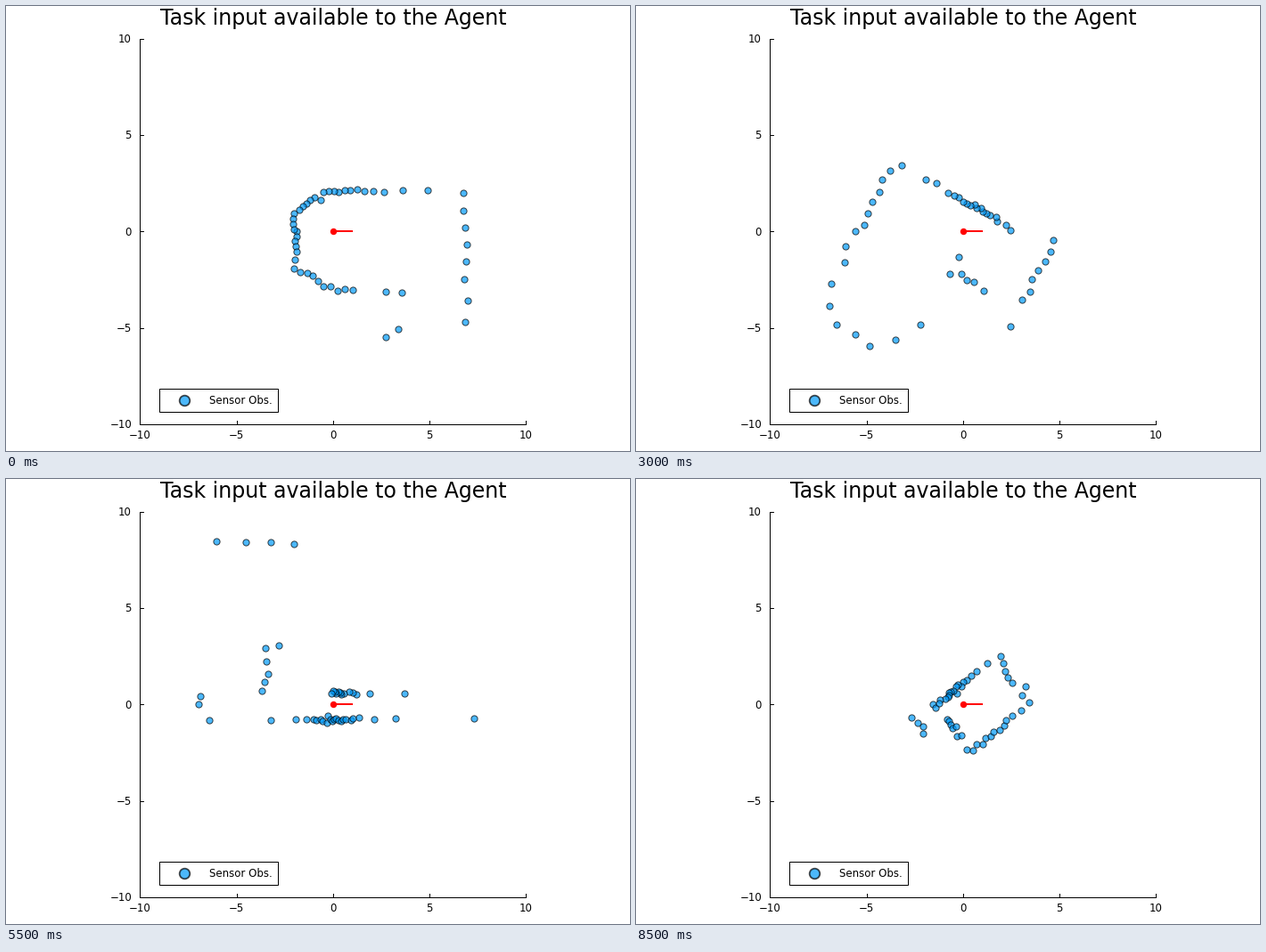
Animation of 700x500 px, one loop 9 s. Source, as a matplotlib script:

```python
import numpy as np
import matplotlib.pyplot as plt
from matplotlib.animation import FuncAnimation
from matplotlib.patches import Rectangle

W, H, DPI = 700, 500, 100
STEPS, STEP_MS = 18, 500
RAYS = np.radians(-180 + np.arange(50) * 360 / 49.5)
NOISE = 0.11
CX, CY, UNIT = 366.8, 253.4, 21.65
BLUE, RED = "#009afa", "red"

plt.rcParams["font.family"] = "DejaVu Sans"

# Floor plan: each line of walls runs through its corners.
FLOOR_PLAN = [
    # large room, south wall of the hall, east side of the corridor
    [(0, 5.32), (0, 6.9), (1.3, 8.7), (4.2, 8.6), (5.2, 6.8), (5.3, -0.1),
     (-2.55, -0.1), (-2.55, -4.45)],
    # hall and north passage
    [(0, 4.42), (0, 2.3), (0, 3.35), (-2.45, 3.35), (-2.45, 6.75),
     (-8.5, 6.75)],
    [(-3.95, 6.75), (-3.95, 4)],
    # west side and end of the corridor
    [(-3.95, 3.2), (-3.85, -10.3), (-2.55, -10.3), (-2.55, -5.2)],
    # small room
    [(-2.55, -4.45), (-2.55, -4.25), (1.55, -4.25), (1.55, -7.25),
     (-2.55, -7.25)],
]
START = np.array([p for wall in FLOOR_PLAN for p in wall[:-1]])
SPAN = np.array([p for wall in FLOOR_PLAN for p in wall[1:]]) - START

# The agent's walk: step, x, y, heading in degrees.
WALK = np.array([
    (0, 3.1, 6.75, -90), (2, 2.45, 4.2, -114), (4, 2, 3.1, -121),
    (6, 0.5, 1.3, -150), (8, -1.9, 1.5, -161), (9, -2.6, 0.9, -130),
    (11, -3.15, -0.2, -90), (13, -3.15, -2.65, -90), (14, -3.1, -3.9, -75),
    (15, -3.05, -4.55, -13), (16, -2.5, -4.8, -20), (17, -1.35, -5.15, -39),
]).T


def cross(a, b):
    return a[..., 0] * b[..., 1] - a[..., 1] * b[..., 0]


def cast(pos, angles):
    """Distance from pos to the nearest wall along each angle."""
    ray = np.stack([np.cos(angles), np.sin(angles)], axis=-1)[:, None]
    to_wall = START - pos
    det = cross(ray, SPAN)
    with np.errstate(divide="ignore", invalid="ignore"):
        dist = cross(to_wall, SPAN) / det
        along = cross(to_wall, ray) / det
    hit = (dist > 0) & (along >= 0) & (along <= 1)
    return np.where(hit, dist, 99).min(axis=1)


def stage(x, y):
    return CX + UNIT * x, CY - UNIT * y


def dots_at(step):
    x, y, heading = (np.interp(step, WALK[0], col) for col in WALK[1:])
    noise = np.random.default_rng(step).normal(0, NOISE, RAYS.size)
    dist = cast(np.array([x, y]), RAYS + np.radians(heading)) + noise
    x, y = dist * np.cos(RAYS), dist * np.sin(RAYS)
    seen = (abs(x) < 10) & (abs(y) < 10)
    return np.column_stack(stage(x[seen], y[seen]))


def pt(px):
    return px * 72 / DPI


fig = plt.figure(figsize=(W / DPI, H / DPI), dpi=DPI, facecolor="white")
ax = fig.add_axes([0, 0, 1, 1])
ax.set(xlim=(0, W), ylim=(H, 0))
ax.axis("off")


def line(xs, ys, color="black", px=1, **kw):
    ax.plot(xs, ys, color=color, lw=pt(px), **kw)


def label(x, y, text, px=11.75, ha="center", **kw):
    ax.text(x, y, text, fontsize=pt(px), ha=ha, va="baseline", **kw)


def dot_style(size, edge):
    return dict(s=pt(size) ** 2, c=BLUE, alpha=0.7, edgecolors="black",
                linewidths=pt(edge))


LEFT, TOP = stage(-10, 10)
RIGHT, BOTTOM = stage(10, -10)
line([LEFT, LEFT], [TOP, BOTTOM])
line([LEFT, RIGHT], [BOTTOM, BOTTOM])
for v in range(-10, 11, 5):
    x, y = stage(v, v)
    name = str(v).replace("-", "\u2212")
    line([x, x], [BOTTOM, BOTTOM - 4])
    line([LEFT, LEFT + 4], [y, y])
    label(x, 486.5, name)
    label(141, y + 4.2, name, ha="right")
label(367, 21, "Task input available to the Agent", 23.65)

dots = ax.scatter([], [], zorder=3, **dot_style(7.2, 1))

line([CX, CX + UNIT + 0.6], [CY, CY], RED, 2, zorder=4, solid_capstyle="butt")
ax.scatter([CX], [CY], s=pt(7.4) ** 2, c=RED, linewidths=0, zorder=5)

ax.add_patch(Rectangle((171.6, 429.6), 133.6, 26, fc="white", ec="black",
                       lw=pt(1), zorder=6))
ax.scatter([200.3], [442.5], zorder=7, **dot_style(11.6, 1.8))
label(227.6, 447, "Sensor Obs.", ha="left", zorder=7)


def draw(step):
    dots.set_offsets(dots_at(step))
    return dots,


anim = FuncAnimation(fig, draw, frames=STEPS, interval=STEP_MS,
                     repeat=True, repeat_delay=0, blit=False)
plt.show()
```
